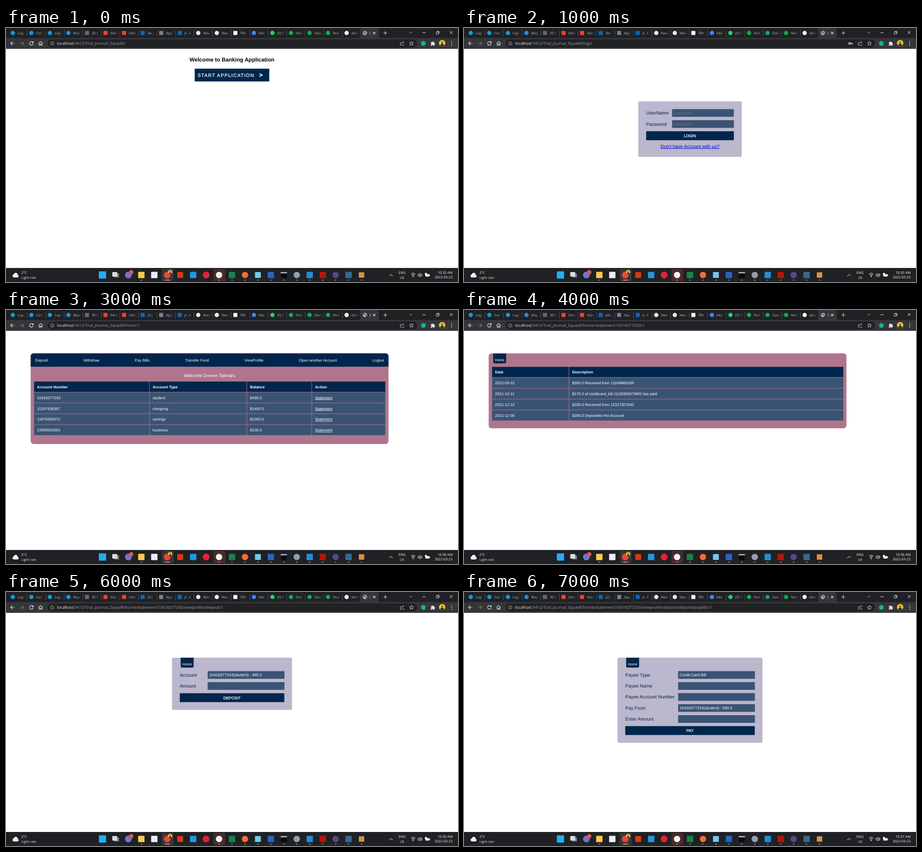
An HTML page for the animation above (8000 ms loop, 998 px wide and 561 px high).

```html
<!DOCTYPE html>
<html lang="en">
<head>
<meta charset="utf-8">
<title>Banking demo</title>
<style>
html, body { margin: 0; width: 100%; height: 100%; overflow: hidden; background: #fff; }
svg { display: block; text-rendering: geometricPrecision; }
.ui { font-family: "Open Sans", "Noto Sans", sans-serif; }
.page { font-family: "Liberation Sans", Arial, sans-serif; }
</style>
</head>
<body>
<svg id="stage" width="998" height="561" viewBox="0 0 998 561"></svg>
<script>
const NAVY = '#00264d', SLATE = '#3a5374', LILAC = '#bbb7cd', ROSE = '#af758d';
const BAR = '#202124', TOOL = '#35363a', PALE = '#dfe1e5';

const rect = (x, y, w, h, fill, r = 0, extra = '') =>
  `<rect x="${x}" y="${y}" width="${w}" height="${h}" rx="${r}" fill="${fill}" ${extra}/>`;
const circle = (x, y, r, fill, extra = '') =>
  `<circle cx="${x}" cy="${y}" r="${r}" fill="${fill}" ${extra}/>`;
const text = (x, y, str, size, fill = '#fff', extra = '') =>
  `<text x="${x}" y="${y}" font-size="${size}" fill="${fill}" ${extra}>${str}</text>`;
const line = (d, stroke = PALE, w = 1, extra = '') =>
  `<path d="${d}" fill="none" stroke="${stroke}" stroke-width="${w}" ${extra}/>`;
const shape = (d, fill) => `<path d="${d}" fill="${fill}"/>`;
const badge = (kind, x, y, size, fill) => kind === 'c'
  ? circle(x, y, size / 2, fill)
  : rect(x - size / 2, y - size / 2, size, size, fill, 1);
const MID = ' text-anchor="middle"', END = ' text-anchor="end"', BOLD = ' font-weight="700"';
const HEAVY = ' stroke="#fff" stroke-width=".3"';

// Browser chrome
const TABS = [
  ['c', '#1798d8', 'Logi'], ['c', '#1798d8', 'Con'], ['c', '#1798d8', 'Logi'],
  ['c', '#1d8fe8', 'Map'], ['s', '#6d6572', '30 S'], ['s', '#ea4335', 'Inbo'],
  ['s', '#ea4335', 'Inbo'], ['s', '#0a66c2', ''], ['s', '#6f8196', 'App'],
  ['s', '#0a66c2', 'Jr. A'], ['c', '#e8eaed', 'New'], ['c', '#e8eaed', 'New'],
  ['s', '#f1f3f4', 'TRK'], ['c', '#4285f4', 'k4d'], ['c', '#25d366', '(5) V'],
  ['c', '#13aa52', 'find'], ['c', '#13aa52', 'Data'], ['c', '#13aa52', 'find'],
  ['c', '#f1f3f4', 'dorv']
];
const tabX = i => 15 + i * 40.95;

function tabLabel(i, str) {
  const x = tabX(i);
  return text(x + 10.5, 13.6, str, 7.5, '#b9bdc2') + rect(x + 18, 4, 12, 14, 'url(#fade)') +
    rect(x + 29.5, 4, 22, 14, BAR);
}

function tabs() {
  let out = TABS.map((t, i) => t[2] && tabLabel(i, t[2])).join('');
  TABS.forEach(([kind, fill], i) => {
    out += badge(kind, tabX(i), 11, kind === 'c' ? 9.5 : 9, fill);
    if (i < 18) out += rect(tabX(i) + 31.2, 5, .8, 13, '#5f6368');
  });
  const x = tabX(19);
  out += shape('M778 22Q782 22 782 18V5Q782 0 787 0H818Q823 0 823 5V18Q823 22 827 22Z', TOOL);
  out += circle(x - .5, 11, 4.7, '#b8bcc1') +
    shape('M789 9l3-2 2 1-1 2 3 1 1 3-2 1-2-3-3-1z', '#606368');
  return out + line('M810.5 8.6l5 5m0-5l-5 5', '#fff', 1.1);
}

function toolbar() {
  return rect(0, 22, 998, 24, TOOL) + rect(0, 45.3, 998, .8, '#4a444c') +
    rect(92, 25.3, 816, 17.6, BAR, 8.8) +
    line('M18.5 34H10m4-4l-4 4 4 4', PALE, 1.2) +
    line('M30.5 34H39m-4-4l4 4-4 4', '#77797d', 1.2) +
    line('M59.3 31.4a4 4 0 1 0 .7 3.6M60 29.5v3h-3', PALE, 1.3) +
    line('M72 34l4.5-4 4.5 4M73.3 33.5v4.7h2.2v-2.7h2v2.7h2.2v-4.7', PALE, 1.1) +
    circle(102, 34, 3.8, 'none', 'stroke="#b9bdc2" stroke-width=".9"') +
    line('M102 33.5v2.6m0-4.3v.9', '#b9bdc2', .9) +
    line('M873 32h-2.5v6h8v-2M873 35.5q.5-4 5-4m-2-2l2.4 2-2.4 2', '#c4c7cb', .9) +
    line('M895.3 29.5l1.3 3 3.2.3-2.4 2.1.7 3.2-2.8-1.7-2.8 1.7.7-3.2-2.4-2.1 3.2-.3z', '#d0d3d7', 1) +
    circle(921.5, 34, 5.2, '#11b886') +
    shape('M938 31.3h2.5a1.5 1.5 0 0 1 3 0h2.3v2.5a1.5 1.5 0 0 1 0 3v2.2h-2.4a1.4 1.4 0 0 0-2.8 0H938v-2.5a1.4 1.4 0 0 0 0-2.8z', '#e4e6e9') +
    person(963, 33.5, 7) +
    [30, 34, 38].map(y => circle(984, y, 1, PALE)).join('');
}

function person(x, y, r) {
  return circle(x, y, r, '#f5c328') + circle(x, y - r * .25, r * .3, '#6f4a32') +
    shape(`M${x - r * .62} ${y + r * .76}Q${x - r * .5} ${y + r * .1} ${x} ${y + r * .1}T${x + r * .62} ${y + r * .76}Q${x} ${y + r * 1.2} ${x - r * .62} ${y + r * .76}Z`, '#2c3442');
}

function windowButtons() {
  return line('M833.5 11h8m-4-4v8', PALE, 1.1) + line('M890.5 8.5l3.2 3.2 3.2-3.2', '#b9bdc2', 1) +
    line('M919.5 10.5h7', '#fff', .9) +
    line('M950 8.8h4.8v4.8H950zM951.5 8.5V7.3h4.8v4.8h-1.2', '#fff', .8) +
    line('M980 7l6 6m0-6l-6 6', '#fff', .9);
}

// Taskbar: kind, colour, size, running
const APPS = [
  ['s', '#22aef0', 16], null, ['c', '#7076cf', 15], ['s', '#f8cb4a', 14, 1],
  ['s', '#e9eef3', 14], ['c', '#e8453a', 15], ['s', '#d83b10', 13],
  ['s', '#2496e2', 14], ['c', '#e9202d', 15], ['c', '#f4f6f5', 14, 1],
  ['s', '#1c8049', 14, 1], ['c', '#f76b36', 14, 1], ['s', '#75c8e8', 13, 1],
  ['s', '#2a63c0', 14, 1], ['s', '#080a0c', 13, 1], ['c', '#92a0ae', 14, 1],
  ['s', '#1f8fd5', 14, 1], ['s', '#b5160c', 14, 1], ['c', '#544a86', 14, 1],
  ['s', '#356b8f', 14, 1], ['s', '#d99048', 12, 1]
];

function taskbar() {
  let out = rect(0, 530, 998, 31, '#1f2125') +
    rect(344, 532, 26, 27, '#35373b', 2) + rect(458, 532, 26, 27, '#4b2a2b', 2);
  APPS.forEach((app, i) => {
    const x = 213 + i * 28.6;
    if (!app) {
      out += rect(x - 3, 542, 11, 9, '#777c82', 1) + rect(x - 7, 539, 11, 10, '#d9dcdf', 1);
      return;
    }
    const [kind, fill, size, on] = app;
    out += badge(kind, x, 545.5, size, fill);
    if (fill === '#080a0c') out += rect(x - 7, 539, 14, 3, '#a9adb1');
    if (on) out += rect(x - 2, 556, 4, 1.6, '#a2a5a9', .8);
  });
  out += circle(276.5, 539.5, 5, '#d94b3c') + text(276.5, 542.2, '1', 7, '#fff', MID) +
    person(362.5, 539, 4.8) + rect(351, 556, 11, 1.8, '#f0906e', .9);
  out += circle(18, 547.5, 3.5, '#e6eef7') + circle(21.5, 545, 4.3, '#f5f8fc') +
    circle(25, 548, 3, '#cfdff0') + rect(17, 547, 9, 4, '#e6eef7', 2);
  out += text(34, 543.4, '2°C', 7.5) + text(34, 553.6, 'Light rain', 7.5, '#e2e3e4') +
    line('M846 548l4-4 4 4', '#fff', 1) +
    text(874.5, 543.2, 'ENG', 7.5, '#fff', MID) + text(874.5, 553.6, 'US', 7.2, '#fff', MID);
  out += line('M894 543.7q5-4.4 10 0M895.7 545.8q3.3-3 6.6 0M897.3 547.8q1.7-1.6 3.4 0', '#fff', 1) +
    circle(899, 549.3, 1, '#fff') +
    line('M909.5 544h2l2.5-2.2v8l-2.5-2.2h-2zM915.5 543.7q1.6 2 0 4.2M917 542q3 3.7 0 7.5', '#fff', .9) +
    rect(926, 543.5, 9, 5.5, '#fff', 1) + rect(935.3, 545, 1, 2.5, '#fff') +
    shape('M925 541h4v4q-2 2.5-4 0z', '#fff');
  return out + text(986, 553.4, '2022-03-23', 7.6, '#fff', END);
}

// Page parts
const field = (x, y, w, str = '', fill = '#fff') =>
  rect(x, y - .2, w + .3, 17, SLATE) + text(x + 3.5, y + 11.2, str, 8.67, fill);
const label = (x, y, str) => text(x, y, str, 10.4, NAVY);
const button = (x, y, w, h, str, extra = '') =>
  rect(x, y, w, h, NAVY) + text(x + w / 2, y + h / 2 + 3.1, str, 8.67, '#fff', MID + HEAVY + extra);
const homeTab = (x, y) =>
  shape(`M${x} ${y}h28.6v18.5q0 3.5-3.5 3.5h-21.6q-3.5 0-3.5-3.5z`, NAVY) + text(x + 3.9, y + 17, 'Home', 7.8);
const radio = (x, y, on) => on
  ? circle(x, y, 3.7, '#fff', 'stroke="#0b72e8" stroke-width="1.1"') + circle(x, y, 2.3, '#0b72e8')
  : circle(x, y, 3.8, '#fff', 'stroke="#767676" stroke-width=".7"');

function table(y, edges, inset, rows) {
  return rows.map((row, r) => row.map((cell, c) => {
    const top = y + r * 23.9, link = cell === 'Statement' ? 'text-decoration="underline"' : '';
    return rect(edges[c], top, edges[c + 1] - edges[c] - 1, 22.9, r ? SLATE : NAVY) +
      text(edges[c] + inset, top + 14.7, cell, 8.45, '#fff', r ? link : BOLD);
  }).join('')).join('');
}

function start() {
  return text(499, 74.2, 'Welcome to Banking Application', 12.1, '#000', MID + BOLD) +
    rect(416.7, 89.8, 164.6, 28.3, NAVY) +
    text(423, 107.8, 'START APPLICATION', 10.4, '#fff', 'letter-spacing="1.3"' + HEAVY) +
    line('M559.5 100.7l6.3 3.2-6.3 3.2', '#fff', 1.8);
}

function login(message = '') {
  return text(5.2, 61, message, 10.4, '#111') + rect(384.7, 162, 228.6, 122.7, LILAC, 3.5) +
    label(402, 191.2, 'UserName') + field(459.5, 179.4, 136, 'Username', '#75777d') +
    label(402, 215.6, 'Password') + field(459.5, 203.8, 136, 'Password', '#75777d') +
    button(402.2, 228, 193.6, 19.8, 'LOGIN') +
    text(499, 264.6, "Don't have Account with us?", 10.4, '#0808e4', MID + ' text-decoration="underline"');
}

function home() {
  const nav = [[64.3, 'Deposit'], [171, 'Withdraw'], [284.6, 'Pay Bills'], [395.4, 'Transfer Fund'],
    [526.4, 'ViewProfile'], [646.7, 'Open another Account'], [809, 'Logout']];
  return rect(54.5, 95.7, 790, 200.3, ROSE, 6.5) +
    shape('M54.5 125.3V102.2q0-6.5 6.5-6.5H838q6.5 0 6.5 6.5V125.3z', NAVY) +
    nav.map(([x, str]) => text(x, 113.5, str, 8.45)).join('') +
    text(449.5, 148.2, 'Welcome Dorven Talimaru', 9.75, '#fff', MID) +
    table(158, [62, 317.2, 532.2, 675.6, 838.5], 6.6, [
      ['Account Number', 'Account Type', 'Balance', 'Action'],
      ['10418377243', 'student', '$490.0', 'Statement'],
      ['11297438367', 'chequing', '$1400.0', 'Statement'],
      ['11876565671', 'savings', '$1000.0', 'Statement'],
      ['19993626561', 'business', '$100.0', 'Statement']
    ]);
}

function statement() {
  return rect(54.5, 95.7, 790, 165.6, ROSE, 6.5) + homeTab(64.4, 96) +
    table(125.6, [62, 232.2, 838.5], 6.6, [
      ['Date', 'Description'],
      ['2022-03-22', '$300.0 Received from 13248860269'],
      ['2021-12-11', '$170.0 of creditcard_bill (112834567890) has paid'],
      ['2021-12-10', '$200.0 Received from 12317307843'],
      ['2021-12-06', '$300.0 Deposited into Account']
    ]);
}

function profile() {
  const left = [[125.7, 'Dorven'], [150, 'Talimaru'], [174.5, '2500.0'], [219.4, '1998-08-07'], [264.2, '5550142936']];
  const right = ['dorventalimaru4@mbox.test', '48 Willowmarrow Road', 'Toronto', 'Ontario', 'Z4K8W5', 'Canada'];
  return rect(304, 95.7, 389.8, 222.3, LILAC, 3.5) + homeTab(323.3, 96) +
    left.map(([y, str]) => field(321, y, 169.3, str)).join('') +
    right.map((str, i) => field(507.7, 125.7 + i * 24.4, 169.2, str)).join('') +
    label(321, 209.3, 'Male :') + radio(359.6, 205, 1) + label(368.6, 209.3, 'Female :') + radio(416.1, 205) +
    label(321, 254.1, 'Single :') + radio(363.2, 249.8, 1) + label(372, 254.1, 'Married :') +
    radio(423.5, 249.8) + label(432.4, 254.1, 'Divorced:') + radio(486.5, 249.8) +
    button(313.4, 288.3, 371.4, 19.6, 'UPDATE', ' letter-spacing="1.3"');
}

function form(x, w, labelW, rows, action) {
  const end = 145 + 30.3 + rows.length * 24.2;
  return rect(x, 145, w, end + 36.8 - 145, LILAC, 3.5) + homeTab(x + 19.2, 145) +
    rows.map(([name, value], i) => label(x + 17.2, 186.8 + i * 24.3, name) +
      field(x + labelW, 175 + i * 24.3, 169.2, value)).join('') +
    button(x + 17.2, end - .1, w - 34.2, 19.6, action);
}

const deposit = () => form(366.5, 265, 78.8, [
  ['Account', '10418377243(student) : 490.0'], ['Amount']
], 'DEPOSIT');

const payBills = () => form(338.8, 320.2, 134, [
  ['Payee Type', 'Credit Card Bill'], ['Payee Name'], ['Payee Account Number'],
  ['Pay From', '10418377243(student) : 590.0'], ['Enter Amount']
], 'PAY');

// One row per second: path, clock minute, eighth tab, active tab, page, saved-password key
const PROFILE = 'home/statement/10418377243/viewprofile/';
const WRONG = 'Username and password are incorrect!!';
const SCENES = [
  ['', 35, 'Tev r', 'I', start()],
  ['login', 35, 'Tev r', 'I', login(), true],
  ['login', 36, 'Tev r', 'I', login(WRONG), true],
  ['home/1', 36, '(2) J', 'W', home()],
  ['home/statement/10418377243/1', 36, 'Jobs', 'S', statement()],
  [PROFILE + '1', 36, '(2) J', 'V', profile()],
  [PROFILE + 'deposit/1', 36, '(2) J', 'I', deposit()],
  [PROFILE + 'deposit/deposit/paybills/1', 37, '(2) J', 'I', payBills()]
];

const KEY = circle(851.5, 34, 2, 'none', 'stroke="#dfe1e5" stroke-width="1.4"') +
  line('M853.5 34h5m-1.2 0v2.2', PALE, 1.4);

const scene = ([path, minute, peer, title, page, key]) => `<g class="scene" visibility="hidden">
  <g class="page">${page}</g>
  <g class="ui">
    <text x="112.8" y="37.2" font-size="8.75" fill="#9aa0a6"><tspan fill="#f1f3f4">localhost</tspan>:9412/Trial_Journal_SquadK/${path}</text>
    ${text(312.2, 13.6, peer, 7.5, '#b9bdc2', 'clip-path="url(#peer)"')}
    ${rect(319, 4, 9, 14, 'url(#fade)')}
    ${text(802.6, 13.6, title, 7.5, '#e8eaed', 'clip-path="url(#active)"')}
    ${text(986, 543.2, `10:${minute} AM`, 7.6, '#fff', END)}
    ${key ? KEY : ''}
  </g></g>`;

document.getElementById('stage').innerHTML = `<defs>
  <linearGradient id="fade"><stop stop-color="${BAR}" stop-opacity="0"/><stop offset="1" stop-color="${BAR}"/></linearGradient>
  <clipPath id="peer">${rect(310, 2, 17, 18, '#fff')}</clipPath>
  <clipPath id="active">${rect(801, 2, 4.6, 18, '#fff')}</clipPath></defs>
  ${rect(0, 0, 998, 561, '#fff')}${rect(0, 0, 998, 22, BAR)}
  <g class="ui">${tabs()}${windowButtons()}${toolbar()}${taskbar()}</g>
  ${SCENES.map(scene).join('')}`;

const scenes = [...document.querySelectorAll('.scene')];
let shown = -1;
function tick() {
  const now = Math.floor(performance.now() / 1000) % scenes.length;
  if (now !== shown) {
    scenes.forEach((el, i) => el.setAttribute('visibility', i === now ? 'visible' : 'hidden'));
    shown = now;
  }
  requestAnimationFrame(tick);
}
tick();
</script>
</body>
</html>
```
